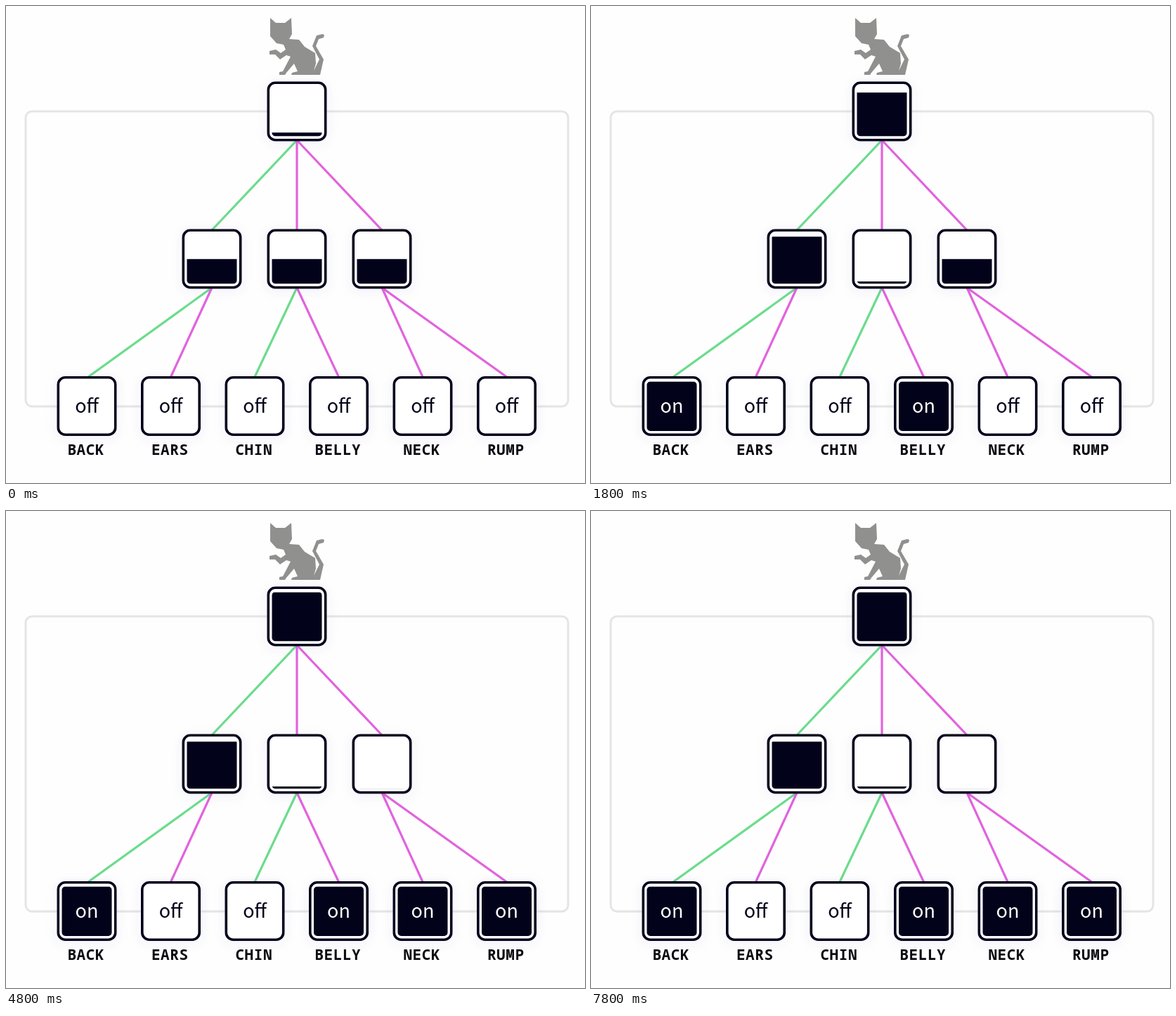
These frames come from a looping animation (824x679 px, 8000 ms). An HTML page:

```html
<!DOCTYPE html>
<html lang="en">
<head>
<meta charset="utf-8">
<title>Cat network</title>
<style>
  html, body { margin: 0; width: 100%; height: 100%; overflow: hidden; background: #fefefe; }
  svg { display: block; }
  .panel { fill: none; stroke: #e5e5e5; stroke-width: 3; }
  .link { stroke-width: 3.2; }
  .box { fill: #fff; stroke: #02021a; stroke-width: 3.6; }
  .ink { fill: #02021a; }
  .state { font: 27px "Noto Sans CJK JP", "Noto Sans CJK SC", "Noto Sans", sans-serif; fill: #02021a; text-anchor: middle; }
  .state.on { fill: #fff; font-weight: 500; }
  .label { font: 600 21px "Noto Sans Mono", monospace; letter-spacing: .6px; fill: #0a0a12; text-anchor: middle; }
</style>
</head>
<body>
<svg id="stage" width="824" height="679" viewBox="0 0 824 679">
  <defs>
    <clipPath id="well"><rect x="-35.5" y="-35" width="71" height="70.5" rx="5"/></clipPath>
    <filter id="glow" x="-40%" y="-40%" width="180%" height="180%">
      <feDropShadow dx="0" dy="3" stdDeviation="8" flood-color="#5050c0" flood-opacity=".08"/>
    </filter>
  </defs>
  <rect class="panel" x="28" y="150" width="772" height="420" rx="9"/>
  <g fill="#90908e">
    <path d="M376 17L384 24H397L406 17L407 40L403 47L417 48L425 58L440 67L441 82L438 92L446 76L436 57L442 42L450 40L453 41L452 45L445 47L441 57L452 76L447 98H406L407 95L415 93L410 82L399 95L397 98H389V94L394 93L405 72L399 70L390 76L383 69H375V64L384 62L391 67L398 62L395 55L385 53L376 43Z"/>
  </g>
</svg>
<script>
const LOOP = 8000;
const stage = document.getElementById('stage');
const names = ['BACK', 'EARS', 'CHIN', 'BELLY', 'NECK', 'RUMP'];
const leafSigns = [1, -1, 1, -1, -1, -1];
const hiddenSigns = [1, -1, -1];
// Each event flips one input: [time in ms, input index].
const flips = [[800, 0], [1600, 3], [3000, 4], [4400, 5], [6400, 2], [7400, 2]];

function add(parent, tag, attrs, text) {
  const el = document.createElementNS('http://www.w3.org/2000/svg', tag);
  for (const key in attrs) el.setAttribute(key, attrs[key]);
  if (text) el.textContent = text;
  return parent.appendChild(el);
}

function link(x1, y1, x2, y2, sign) {
  add(stage, 'line', { class: 'link', x1, y1, x2, y2, stroke: sign > 0 ? '#6bdc8c' : '#e263dd' });
}

function node(x, y) {
  const g = add(stage, 'g', { transform: `translate(${x} ${y})` });
  add(g, 'rect', { class: 'box', x: -40.7, y: -40.7, width: 81.4, height: 81.4, rx: 10, filter: 'url(#glow)' });
  const clip = add(g, 'g', { 'clip-path': 'url(#well)' });
  const fill = add(clip, 'rect', { class: 'ink', x: -36, width: 72 });
  const setLevel = v => {
    fill.setAttribute('y', 35.5 - 70.5 * v);
    fill.setAttribute('height', 70.5 * v);
  };
  return { g, setLevel };
}

const leafX = i => 115 + 119.5 * i;
const hiddenX = i => 293 + 121 * i;

hiddenSigns.forEach((s, i) => link(414, 191, hiddenX(i), 319, s));
leafSigns.forEach((s, i) => link(hiddenX(i >> 1), 401, leafX(i) + (i ? 0 : 2), 528, s));

const root = node(414, 150);
const hidden = hiddenSigns.map((s, i) => node(hiddenX(i), 360));
const leaves = names.map((name, i) => {
  const leaf = node(leafX(i), 569.5);
  leaf.text = add(leaf.g, 'text', { y: 9.5 });
  add(stage, 'text', { class: 'label', x: leafX(i) - 1.2, y: 639 }, name);
  return leaf;
});

const sigmoid = v => 1 / (1 + Math.exp(-v));

function draw(t) {
  const input = names.map(() => 0);
  for (const [at, i] of flips) if (t >= at) input[i] ^= 1;

  leaves.forEach((leaf, i) => {
    leaf.setLevel(input[i]);
    leaf.text.textContent = input[i] ? 'on' : 'off';
    leaf.text.setAttribute('class', input[i] ? 'state on' : 'state');
  });

  let sum = 0;
  hidden.forEach((h, i) => {
    const a = 2 * i, b = a + 1;
    const level = sigmoid(3 * (leafSigns[a] * input[a] + leafSigns[b] * input[b]));
    h.setLevel(level);
    sum += 5 * hiddenSigns[i] * level;
  });
  root.setLevel(sigmoid(sum));
}

const start = performance.now();
function tick() {
  draw((performance.now() - start) % LOOP);
  requestAnimationFrame(tick);
}
tick();
</script>
</body>
</html>
```
